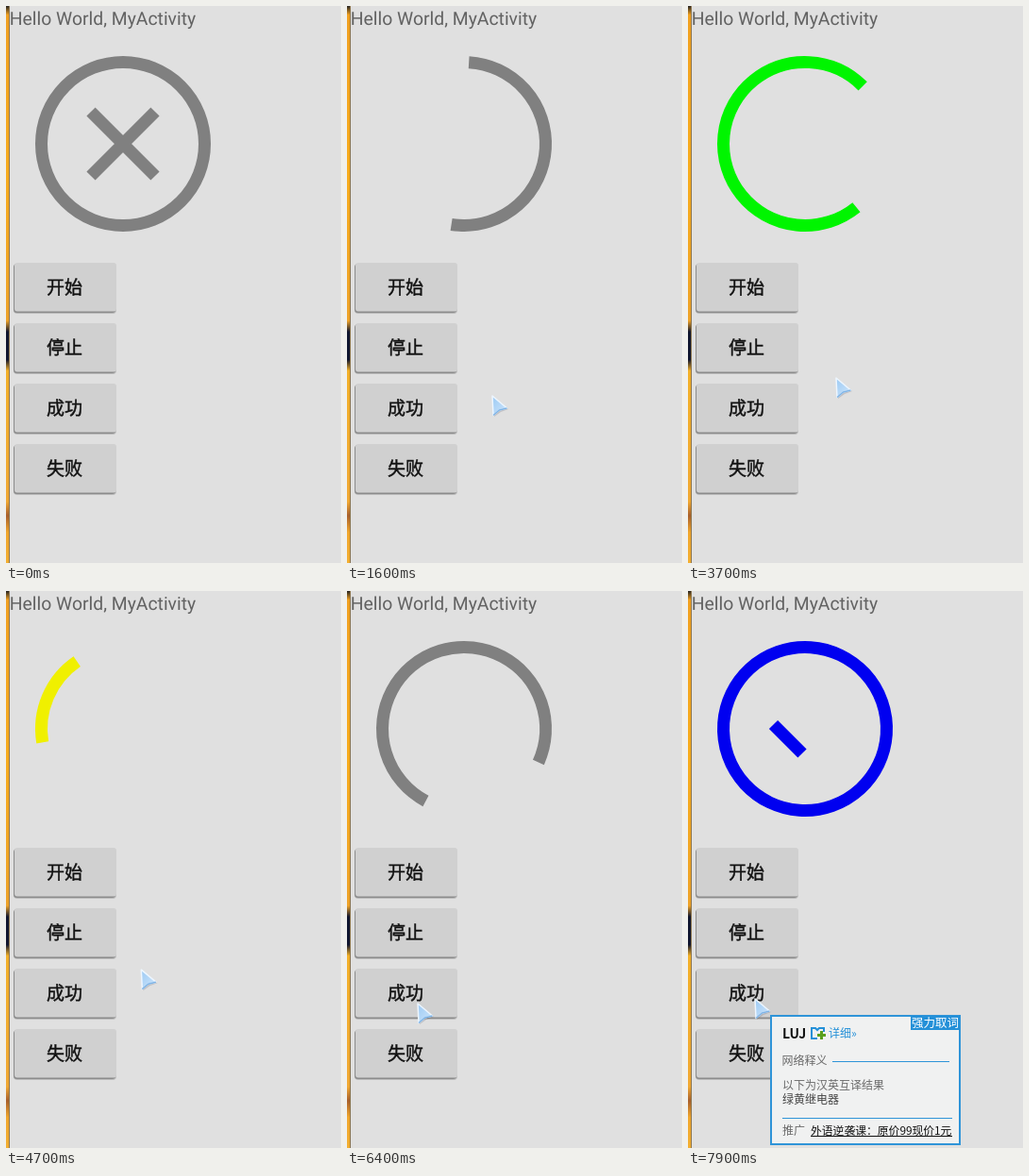
Animation of 355 by 590 pixels, one loop 8 s. Source, as an HTML page:

```html
<!DOCTYPE html>
<html lang="zh-CN">
<head>
<meta charset="utf-8">
<title>Loading ring</title>
<style>
  html, body { margin: 0; width: 100%; height: 100%; overflow: hidden; background: #e0e0e0; }
  svg { display: block; width: 355px; height: 590px; }
  text { font-family: "Noto Sans CJK SC", "Noto Sans CJK", sans-serif; font-size: 12px; fill: #6a6a6a; }
  .title { font: 19.35px Roboto, sans-serif; fill: #626262; text-rendering: geometricPrecision; }
  .label { font-size: 19px; fill: #121212; stroke: #121212; stroke-width: .45px; text-anchor: middle; }
  .stroke { fill: none; stroke-width: 13; }
</style>
</head>
<body>
<svg viewBox="0 0 355 590">
  <defs>
    <linearGradient id="strip" x1="0" y1="0" x2="0" y2="1">
      <stop offset="0" stop-color="#222"/>
      <stop offset=".016" stop-color="#f0a020"/>
      <stop offset=".3" stop-color="#f7ac1c"/>
      <stop offset=".565" stop-color="#eda228"/>
      <stop offset=".585" stop-color="#10162e"/>
      <stop offset=".635" stop-color="#10162e"/>
      <stop offset=".655" stop-color="#f2b028"/>
      <stop offset=".89" stop-color="#f0a832"/>
      <stop offset=".915" stop-color="#a8602c"/>
      <stop offset=".945" stop-color="#f0a62c"/>
      <stop offset="1" stop-color="#f2ae30"/>
    </linearGradient>
    <linearGradient id="ice" x1="0" y1="0" x2="1" y2="1">
      <stop offset="0" stop-color="#9ccaf4"/>
      <stop offset="1" stop-color="#cfe6fb"/>
    </linearGradient>
  </defs>

  <rect width="355" height="590" fill="#e0e0e0"/>
  <rect width="3" height="590" fill="url(#strip)"/>
  <rect x="3" width="1" height="590" fill="#8c7650"/>
  <text class="title" x="3.8" y="20">Hello World, MyActivity</text>

  <circle id="ring" class="stroke" cx="124" cy="146" r="86.5" pathLength="360"/>
  <path id="cross" class="stroke" stroke="#808080" d="M90 112 158 180M158 112 90 180"/>
  <path id="tick" class="stroke"/>
  <g id="buttons"></g>

  <g id="popup">
    <rect x="88" y="450" width="200" height="136" fill="#f0f1f1" stroke="#2f94d8" stroke-width="2"/>
    <rect x="236" y="450" width="52" height="15" fill="#2490d8"/>
    <text x="237" y="462" style="font-size:12.5px;fill:#fff">强力取词</text>
    <text x="100" y="474" style="font-size:14px;font-weight:700;fill:#111">LUJ</text>
    <path d="M137 474h-6v-11h4l2 2 2-2h5v4" fill="none" stroke="#2490d8" stroke-width="2"/>
    <path d="M137 470.500h9M141.500 466v9" stroke="#5aa01e" stroke-width="3"/>
    <text x="149" y="473" style="fill:#2490d8">详细»</text>
    <text x="99.500" y="502">网络释义</text>
    <path d="M153 498.500h124M100 558.500H280" fill="none" stroke="#2f94d8"/>
    <text x="100" y="528">以下为汉英互译结果</text>
    <text x="100" y="543" style="fill:#444">绿黄继电器</text>
    <text x="100" y="576">推广</text>
    <text x="130" y="576" style="font-size:11.8px;fill:#111">外语逆袭课：原价99现价1元</text>
    <path d="M130 577.500H280" stroke="#111"/>
  </g>

  <g id="cursor">
    <path d="M0 0 16 13 8 16 1 21Z" fill="#667" opacity=".25" transform="translate(1 1)"/>
    <path d="M0 0 15.500 13 7.500 15 1 20.500Z" fill="url(#ice)" stroke="#edf6ff" stroke-width="1.500" stroke-linejoin="round"/>
    <path d="M1 20.500 7.500 15 15.500 13" fill="none" stroke="#7fb4e6" stroke-width="1.500"/>
  </g>
</svg>
<script>
const LOOP = 8000, START = 800, POPUP = 6700, SUCCESS = 7700;
const COLORS = ['#808080', '#0000f0', '#00f500', '#f0f000'];

// Tracks hold a time followed by the values reached then.
const SPIN = [[START, 0, 0], [1600, 99, .661], [2300, 219, 1.315], [3700, 411, 2.414],
  [5600, 638, 3.897], [7100, 837, 5.185], [7900, 944, 5.84]];
const POINTER = [[300, 355, 590], [700, 60, 300], [900, 60, 300], [1400, 154, 413],
  [1900, 154, 413], [2200, 154, 394], [2500, 154, 394], [2700, 157, 394],
  [4600, 157, 394], [5200, 75, 437], [6400, 75, 437], [6700, 71, 432]];

const el = id => document.getElementById(id);
const show = (id, on) => el(id).setAttribute('visibility', on ? 'visible' : 'hidden');
const set = (id, attrs) => {
  for (const name in attrs) el(id).setAttribute(name, attrs[name]);
};

function sample(track, t) {
  const i = track.findIndex(key => key[0] > t);
  if (i < 0) return track[track.length - 1].slice(1);
  if (i === 0) return track[0].slice(1);
  const a = track[i - 1], b = track[i];
  const k = (t - a[0]) / (b[0] - a[0]);
  return a.slice(1).map((v, n) => v + (b[n + 1] - v) * k);
}

el('buttons').innerHTML = ['开始', '停止', '成功', '失败'].map((label, i) => `
  <g transform="translate(0 ${272 + 64 * i})">
    <rect x="8" y="2" width="109" height="52" rx="4" fill="#bdbdbd"/>
    <rect x="8" y="1" width="108" height="52" rx="3.500" fill="#8c8c8c"/>
    <rect x="9" width="108" height="51.500" rx="3" fill="#d0d0d0"/>
    <text class="label" x="62" y="33">${label}</text>
  </g>`).join('');

function drawRing(t) {
  if (t < START || t >= SUCCESS) {
    set('ring', { stroke: COLORS[t < START ? 0 : 1], 'stroke-dasharray': 'none' });
    return;
  }
  const [turn, phase] = sample(SPIN, t);
  const cycle = Math.floor(phase);
  const eased = .5 - .5 * Math.cos(Math.PI * (phase - cycle));
  const tail = turn + 360 * Math.max(0, 2 * eased - 1);
  const sweep = 720 * Math.min(eased, 1 - eased);
  set('ring', {
    stroke: COLORS[cycle % COLORS.length],
    'stroke-dasharray': `${sweep} 720`,
    transform: `rotate(${tail} 124 146)`
  });
}

function draw(t) {
  drawRing(t);
  show('cross', t < START);
  show('tick', t > SUCCESS);
  const grown = Math.max(0, (t - SUCCESS) / 200) * 30.5;
  set('tick', { stroke: COLORS[1], d: `M90.5 141.5l${grown} ${grown}` });
  show('popup', t >= POPUP);
  show('cursor', t >= 300);
  set('cursor', { transform: `translate(${sample(POINTER, t)})` });
}

let origin;
function frame(now) {
  origin ??= now;
  draw((now - origin) % LOOP);
  requestAnimationFrame(frame);
}
draw(0);
requestAnimationFrame(frame);
</script>
</body>
</html>
```
